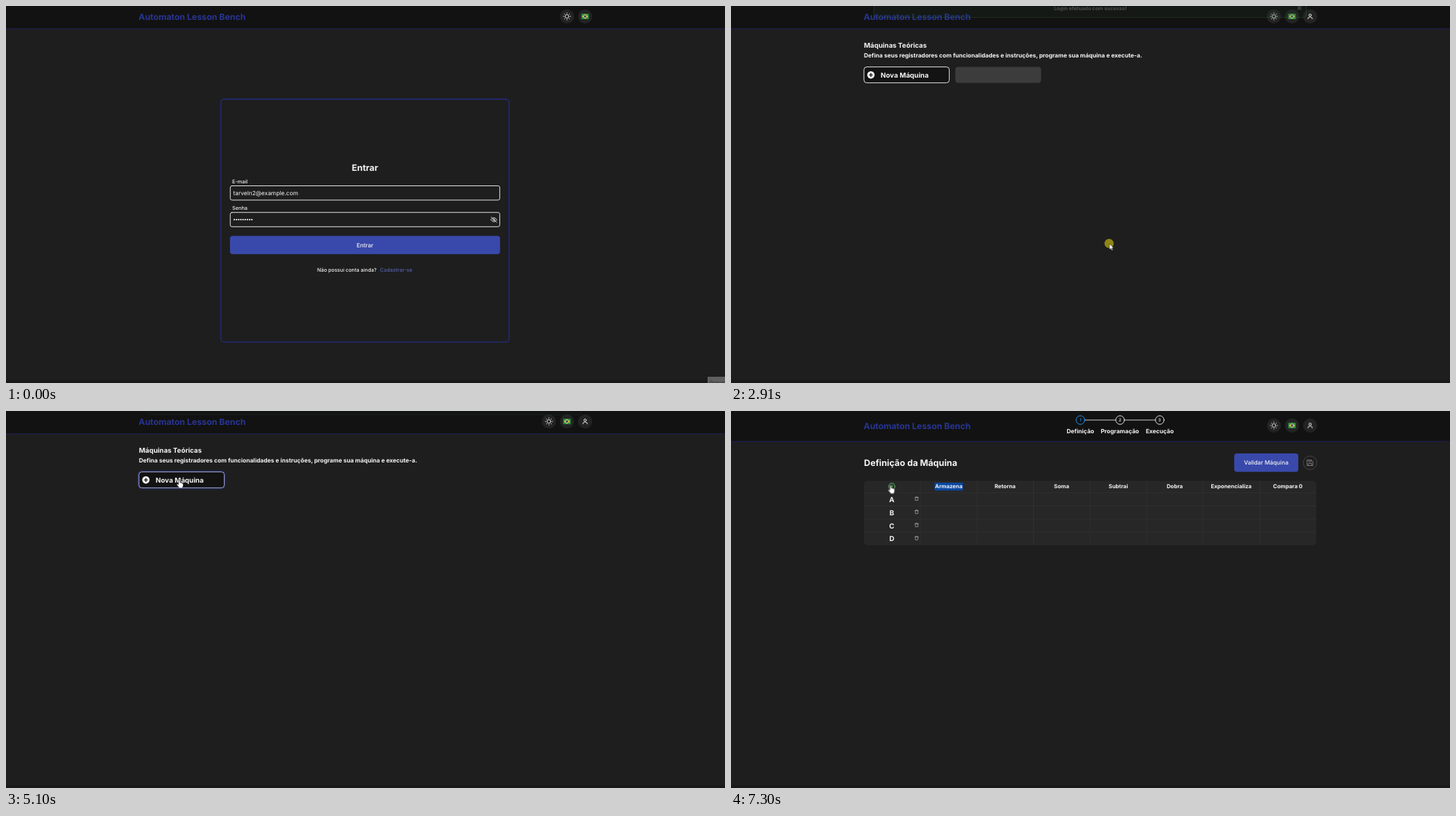
Animation of 1033x542 px, one loop 8 s. Source, as an HTML page:

```html
<!DOCTYPE html>
<html lang="pt-BR">
<head>
<meta charset="utf-8">
<title>Máquinas Teóricas</title>
<style>
html, body { margin: 0; width: 100%; height: 100%; overflow: hidden; background: #1e1e1e; }
.layer { position: absolute; left: 0; top: 0; width: 1033px; height: 542px; overflow: hidden; }
svg { display: block; }
text {
  font-family: Inter, "Open Sans", sans-serif; font-weight: 500; fill: #f5f5f5;
  text-rendering: geometricPrecision; white-space: pre;
}
.b { font-weight: 700; }
.m { text-anchor: middle; }
.line { fill: none; stroke: #e6e6e6; stroke-linecap: round; stroke-linejoin: round; }
.steps text { font-size: 8.45px; }
.heads text { font-size: 7.9px; }
.names text { font-size: 10px; }

/* Every state is held until the next one */
.t { animation: 8s step-end infinite; }
.recorder { animation-name: recorder; }
.login { animation-name: login; }
.nudge { animation-name: nudge; }
.submit { animation-name: submit; }
.home { animation-name: home; }
.skeleton { animation-name: skeleton; }
.new { animation-name: new; }
.define { animation-name: define; }
.empty { animation-name: empty; }
.filled { animation-name: filled; }
.add { animation-name: add; }
.bar { animation-name: bar; }
.brand { animation-name: brand; }
.icons { animation-name: icons; }
.user { animation-name: user; }
.toast { animation-name: toast; }
.click { animation-name: click; }
.arrow { animation-name: arrow; }
.hand { animation-name: hand; }

@keyframes recorder { 0% { opacity: 1 } 8.875%, to { opacity: 0 } }
@keyframes login { 0% { opacity: 1 } 36.375%, to { opacity: 0 } }
@keyframes nudge { 0% { transform: none } 27.125%, to { transform: translateY(.6px) } }
@keyframes submit { 0% { fill: #3949ab } 8.875%, to { fill: #283593 } }
@keyframes home { 0% { opacity: 0 } 36.375% { opacity: 1 } 73%, to { opacity: 0 } }
@keyframes skeleton {
  0% { opacity: 1; fill: #3c3c3c } 45.5% { opacity: 1; fill: #4f4f4f } 54.625%, to { opacity: 0; fill: #4f4f4f }
}
@keyframes new {
  0% { stroke: #e6e6e6; filter: none }
  63.75%, to { stroke: #9fa8da; filter: drop-shadow(0 0 1.5px #3949ab) }
}
@keyframes define { 0% { opacity: 0 } 73%, to { opacity: 1 } }
@keyframes empty { 0% { opacity: 1 } 91.25%, to { opacity: 0 } }
@keyframes filled { 0% { opacity: 0 } 91.25%, to { opacity: 1 } }
@keyframes add {
  0% { stroke: #c4c4c4; transform: translate(231px, 108.5px) }
  82.125%, to { stroke: #66bb6a; transform: translate(231px, 108.5px) scale(1.3) }
}
@keyframes bar { 0% { transform: none } 73%, to { transform: translateY(11px) } }
@keyframes brand { 0% { transform: none } 73%, to { transform: translateY(5.5px) } }
@keyframes icons {
  0% { transform: none } 36.375% { transform: translateX(-26px) } 73%, to { transform: translate(-26px, 5.8px) }
}
@keyframes user { 0% { opacity: 0 } 36.375%, to { opacity: 1 } }
@keyframes toast {
  0% { opacity: 0; transform: translateY(-61px) }
  36.375% { opacity: .26; transform: translateY(-61px) }
  45.5% { opacity: 1; transform: none }
  63.75% { opacity: .1; transform: translateY(-72px) }
  73%, to { opacity: 0; transform: translateY(-72px) }
}
@keyframes click { 0% { opacity: 0 } 36.375% { opacity: 1 } 45.5%, to { opacity: 0 } }
@keyframes arrow {
  0% { opacity: 0; transform: none }
  36.375% { opacity: 1; transform: translate(543.7px, 341.8px) }
  45.5% { opacity: 1; transform: translate(608px, 84px) }
  54.625% { opacity: 0; transform: none }
  73% { opacity: 1; transform: translate(257.5px, 110.8px) }
  82.125%, to { opacity: 0; transform: none }
}
@keyframes hand {
  0% { opacity: 0; transform: none }
  8.875% { opacity: 1; transform: translate(546px, 354px) }
  18% { opacity: 1; transform: translate(508px, 346px) }
  27.125% { opacity: 1; transform: translate(530px, 350.5px) }
  36.375% { opacity: 0; transform: none }
  54.625% { opacity: 1; transform: translate(820.5px, 67px) }
  63.75% { opacity: 1; transform: translate(250px, 104.5px) }
  73% { opacity: 0; transform: none }
  82.125% { opacity: 1; transform: translate(231px, 113.5px) }
  91.25%, to { opacity: 1; transform: translate(230.5px, 112.5px) }
}

.toast {
  position: absolute; left: 204.5px; top: 50px; width: 622px; height: 28px; box-sizing: border-box;
  border: 1px solid #43874a; border-radius: 4px; background: rgba(46, 88, 56, .4);
  -webkit-backdrop-filter: blur(1.3px); backdrop-filter: blur(1.3px);
}
</style>
</head>
<body>
<div class="layer">
<svg width="1033" height="542" viewBox="0 0 1033 542">
  <defs>
    <g id="trash" class="line" style="stroke:#b0b0b0" stroke-width=".7">
      <path d="M-2.5-1.7h5M-1-1.8v-.8h2v.8M-1.9-1.6v4.1h3.8v-4.1"/>
    </g>
  </defs>
  <rect width="1033" height="542" fill="#1e1e1e"/>
  <rect y="538" width="1033" height="4" fill="#191919"/>

  <!-- Header -->
  <g class="t bar">
    <rect y="-20" width="1033" height="52.5" fill="#121212"/>
    <rect y="32.2" width="1033" height="1.2" fill="#1d1d50"/>
  </g>
  <text class="t brand b" x="190.5" y="20" font-size="12.3" style="fill:#283593">Automaton Lesson Bench</text>
  <g class="t icons">
    <g fill="#232323">
      <circle cx="806" cy="15" r="10.2"/><circle cx="832" cy="15" r="10.2"/>
      <circle class="t user" cx="858" cy="15" r="10.2"/>
    </g>
    <g class="line" transform="translate(806 15)" stroke-width=".9">
      <circle r="2.6"/>
      <path d="M0-5.2v1M0 4.2v1M-5.2 0h1M4.2 0h1M-3.7-3.7l.7.7M3 3l.7.7M-3.7 3.7l.7-.7M3-3l.7-.7"/>
    </g>
    <g transform="translate(832 15)">
      <rect x="-5.4" y="-4" width="10.8" height="8" rx=".6" fill="#2e8b45"/>
      <path d="M-4.4 0L0-3.2 4.4 0 0 3.2z" fill="#f0d64a"/>
      <circle r="1.8" fill="#2b3f8c"/>
    </g>
    <g class="t user">
      <g class="line" transform="translate(858 15)" stroke-width="1">
        <circle cy="-1.8" r="1.7"/><path d="M-3 3.6v-.7q0-1.8 1.8-1.8h2.4q1.8 0 1.8 1.8v.7"/>
      </g>
    </g>
  </g>

  <!-- Sign in -->
  <g class="t login">
    <g class="t nudge">
      <rect x="308.8" y="134" width="414" height="349.2" rx="4.5" fill="none" stroke="#232c85" stroke-width="1.3"/>
      <text class="b m" x="515.7" y="237.3" font-size="12.7">Entrar</text>
      <text x="325" y="255" font-size="7.3">E-mail</text>
      <text x="325" y="293.4" font-size="7.3">Senha</text>
      <g class="line">
        <rect x="322.2" y="258.5" width="387.2" height="20.5" rx="2.5"/>
        <rect x="322.2" y="296.8" width="387.2" height="20.5" rx="2.5"/>
        <path d="M328 307.2h25.5" stroke-width="2.3" stroke-dasharray="0 3.15"/>
        <path d="M696.5 307.3q4.4-6.2 8.8 0-4.4 6.2-8.8 0M697 303.3l8 8" stroke-width=".9"/>
        <circle cx="700.9" cy="307.3" r="1.4" stroke-width=".8"/>
      </g>
      <text x="326.5" y="271.6" font-size="8.4" style="font-weight:400">tarveln2@example.com</text>
      <rect class="t submit" x="321.8" y="330.5" width="388" height="26.3" rx="4"/>
      <text class="m" x="515.7" y="346.7" font-size="8.4">Entrar</text>
      <text x="447" y="381.8" font-size="7.3">Não possui conta ainda?</text>
      <text x="537.3" y="381.8" font-size="7.45" style="fill:#5560b0">Cadastrar-se</text>
    </g>
    <g class="t recorder">
      <rect x="1008" y="533" width="25" height="9" fill="#5f5f5f"/>
      <text x="1010.5" y="543.5" font-size="7.2" style="fill:#303030">Gravar</text>
    </g>
  </g>

  <!-- Machine list -->
  <g class="t home">
    <text class="b" x="191" y="60" font-size="9.75">Máquinas Teóricas</text>
    <text class="b" x="191" y="74" font-size="8.45">Defina seus registradores com funcionalidades e instruções, programe sua máquina e execute-a.</text>
    <rect class="t new" x="191" y="87.6" width="122.6" height="22.8" rx="4" fill="#131313"/>
    <circle cx="201" cy="99.1" r="5.3" fill="#f5f5f5"/>
    <path d="M198.2 99.1h5.6M201 96.3v5.6" stroke="#131313" stroke-width="1.4"/>
    <text class="b" x="215" y="102.7" font-size="9.85">Nova Máquina</text>
    <rect class="t skeleton" x="322.3" y="87.4" width="123.2" height="23.2" rx="4"/>
  </g>

  <!-- Machine definition -->
  <g class="t define">
    <g class="line">
      <path d="M508.4 13h44.2M565.4 13h44.2" stroke-width=".9"/>
      <circle cx="502" cy="13" r="6.2" style="stroke:#2196f3"/>
      <circle cx="559" cy="13" r="6.2"/><circle cx="616" cy="13" r="6.2"/>
    </g>
    <g class="m" font-size="6.2">
      <text x="502" y="15.3" style="fill:#2196f3">1</text>
      <text x="558.8" y="15.3">2</text>
      <text x="615.8" y="15.3">3</text>
    </g>
    <g class="steps b m">
      <text class="b" x="502" y="32.4">Definição</text>
      <text class="b" x="558.7" y="32.4">Programação</text>
      <text class="b" x="616" y="32.4">Execução</text>
    </g>
    <text class="b" x="191" y="79" font-size="12.65">Definição da Máquina</text>
    <circle cx="832" cy="74.5" r="9.7" fill="none" stroke="#474747"/>
    <path class="line" d="M828 70.5h6l2 2v6h-8zM830 70.5v2.4h3.6v-2.4M829.8 78.5v-3.2h4.4v3.2" style="stroke:#909090" stroke-width=".8"/>

    <g class="t empty">
      <rect x="715" y="61" width="100" height="26.4" rx="4" fill="#3949ab"/>
      <text class="m" x="765" y="77.2" font-size="8.3">Máquina Aleatória</text>
      <rect x="190.8" y="100.3" width="650" height="16.7" rx="4" fill="#272727"/>
      <path d="M272 100.3v16.7m81.25-16.7v16.7m81.25-16.7v16.7m81.25-16.7v16.7m81.25-16.7v16.7m81.25-16.7v16.7m81.25-16.7v16.7" stroke="#313131"/>
      <rect x="191" y="125.5" width="649.8" height="25" rx="4" fill="#1f2c36" stroke="#2287d8"/>
      <text x="198" y="141" font-size="7.3">Adicione um registrador para iniciar a definição da máquina ou crie uma máquina aleatória.</text>
    </g>

    <g class="t filled">
      <rect x="723" y="61" width="92" height="26.4" rx="4" fill="#3949ab"/>
      <text class="m" x="769" y="77.2" font-size="8.3">Validar Máquina</text>
      <rect x="190.8" y="100.3" width="650" height="92.7" rx="5" fill="#272727"/>
      <path d="M272 100.3v92.7m81.25-92.7v92.7m81.25-92.7v92.7m81.25-92.7v92.7m81.25-92.7v92.7m81.25-92.7v92.7m81.25-92.7v92.7M191 117.5h650M191 136.4h650M191 155.3h650M191 174.2h650" stroke="#2f2f2f"/>
      <rect x="292.5" y="103" width="40.8" height="11.3" fill="#0b47a1"/>
      <g class="names m">
        <text class="b" x="231" y="130.7">A</text>
        <text class="b" x="231" y="149.6">B</text>
        <text class="b" x="231" y="168.5">C</text>
        <text class="b" x="231" y="187.4">D</text>
      </g>
      <use href="#trash" x="266.7" y="126"/><use href="#trash" x="266.7" y="144.9"/>
      <use href="#trash" x="266.7" y="163.8"/><use href="#trash" x="266.7" y="182.7"/>
    </g>

    <g class="heads m">
      <text class="b" x="312.8" y="111.3">Armazena</text>
      <text class="b" x="393.8" y="111.3">Retorna</text>
      <text class="b" x="475" y="111.3">Soma</text>
      <text class="b" x="556.4" y="111.3">Subtrai</text>
      <text class="b" x="637.5" y="111.3">Dobra</text>
      <text class="b" x="718.7" y="111.3">Exponencializa</text>
      <text class="b" x="800" y="111.3">Compara 0</text>
    </g>
    <g class="t add" fill="none" stroke-width=".8">
      <circle r="3.4"/><path d="M-1.6 0h3.2M0-1.6v3.2"/>
    </g>
  </g>
</svg>

<div class="toast t">
  <svg width="620" height="26" viewBox="0 0 620 26">
    <text class="b m" x="310.3" y="15.6" font-size="7.3">Login efetuado com sucesso!</text>
    <path class="line" d="M608.6 10.8l4.2 4.2M612.8 10.8l-4.2 4.2" stroke-width="1.4"/>
  </svg>
</div>
</div>

<!-- Pointer -->
<svg class="layer" width="1033" height="542" viewBox="0 0 1033 542">
  <circle class="t click" cx="543.2" cy="341.3" r="6.6" fill="#8f8616"/>
  <path class="t arrow" d="M0 0v8.6l2-1.8 1.4 3 1.4-.7-1.4-2.9h2.6z" fill="#fff" stroke="#111" stroke-width=".5"/>
  <path class="t hand" d="M-2.2 1.2V-5q0-1.1 1-1.1t1 1.1v3.2q1.4-.4 1.7.5 1.3-.3 1.6.6 1.5-.2 1.5 1.3v2.2q0 1.4-1 2.4v1.3h-5v-1.1L-4.6 1.8q-.5-1 .4-1.3.9-.1 2 .7z" fill="#fff" stroke="#111" stroke-width=".6"/>
</svg>
</body>
</html>
```
